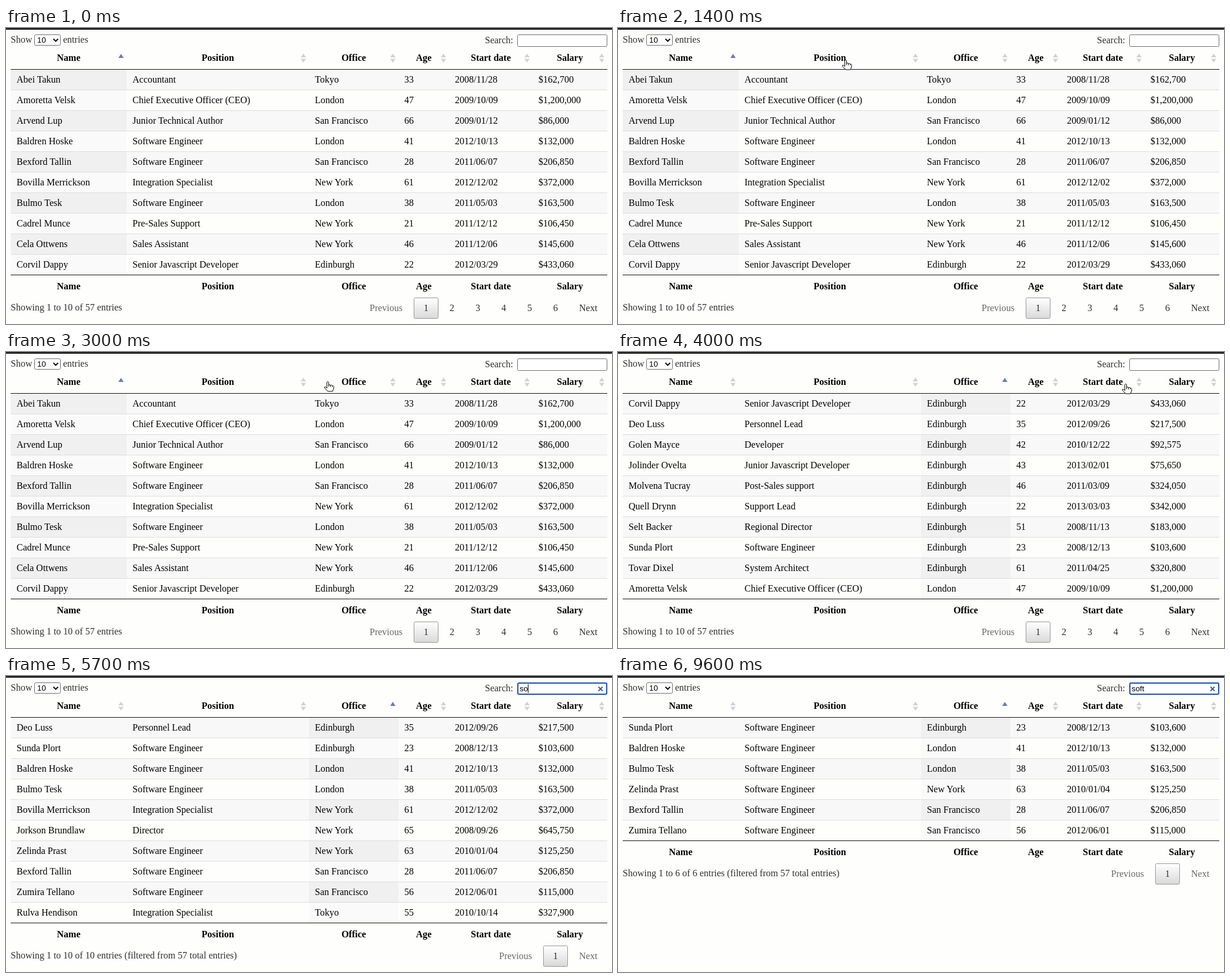
Animation of 1030x504 px, one loop 9700 ms. Source, as an HTML page:

```html
<!DOCTYPE html>
<html lang="en">
<head>
<meta charset="utf-8">
<title>Sortable staff table</title>
<style>
  html, body { margin: 0; width: 100%; height: 100%; overflow: hidden; background: #fefefd; }
  svg { display: block; width: 1030px; height: 504px; }
  text { font: 16px "Liberation Serif", Times, serif; fill: #000; white-space: pre; }
  .head { font-weight: bold; text-anchor: middle; }
  .mid { text-anchor: middle; }
  .soft { fill: #2e2e2e; }
  .off { fill: #666; }
  .ui { font: 13.333px "Liberation Sans", Arial, sans-serif; }
  .line { fill: #ddd; }
  .rule { fill: #111; }
  .odd { fill: #f8f8f8; }
  .odd.sorted { fill: #f0f0f0; }
  .even.sorted { fill: #fafafa; }
  .idle { fill: #d3d3d6; }
  .active { fill: #6c78c4; }
  .field { fill: #fff; stroke: #6e6e6e; }
  .field.focus { stroke: #1b4fae; stroke-width: 2; }
</style>
</head>
<body>
<svg viewBox="0 0 1030 504">
  <defs>
    <linearGradient id="button" x2="0" y2="1">
      <stop offset="0" stop-color="#fff"/>
      <stop offset="1" stop-color="#d9d9d9"/>
    </linearGradient>
  </defs>
  <rect width="1030" height="3" fill="#252525"/>
  <text class="soft" x="8" y="25">Show</text>
  <rect class="field" x="48.5" y="11.5" width="44" height="18" rx="2"/>
  <text class="ui" x="53" y="25">10</text>
  <path d="M80.5 18.5l4 4 4-4" fill="none" stroke="#111" stroke-width="2"/>
  <text class="soft" x="97" y="25">entries</text>
  <text class="soft" x="814" y="26">Search:</text>
  <g id="search"></g>
  <rect id="caret" y="14" width="1" height="15"/>
  <g id="table"></g>
  <g id="pointer" fill="#000" stroke="#fff" stroke-width="1" stroke-linejoin="round">
    <path id="arrow" d="M0 0v15l3.6-3.3 2.6 5.8 2.6-1.1-2.6-5.6h5z"/>
    <path id="hand" fill="#fff" stroke="#000" d="M-1.5 9V1.5Q0-1 1.5 1.5V6q1.5-1 3 .5 2-.8 3 .8 2-.4 2.5 1.4V12l-2 5h-8L-5.5 11q-.5-2.5 2-1.5l2 2zM1.5 6v3M4.5 6.5v3M7.5 7.5v2"/>
    <path id="beam" fill="none" stroke="#000" d="M-3-8q3 0 3 2 0-2 3-2M0-6V6M-3 8q3 0 3-2 0 2 3 2"/>
  </g>
</svg>
<script>
const LOOP = 9700;
const titles = ["Name", "Position", "Office", "Age", "Start date", "Salary"];
const edges = [8, 205, 515, 667, 753, 895, 1022];

const staff = `Abei Takun|Accountant|Tokyo|33|2008/11/28|$162,700
Amoretta Velsk|Chief Executive Officer (CEO)|London|47|2009/10/09|$1,200,000
Arvend Lup|Junior Technical Author|San Francisco|66|2009/01/12|$86,000
Baldren Hoske|Software Engineer|London|41|2012/10/13|$132,000
Bexford Tallin|Software Engineer|San Francisco|28|2011/06/07|$206,850
Bovilla Merrickson|Integration Specialist|New York|61|2012/12/02|$372,000
Bulmo Tesk|Software Engineer|London|38|2011/05/03|$163,500
Cadrel Munce|Pre-Sales Support|New York|21|2011/12/12|$106,450
Cela Ottwens|Sales Assistant|New York|46|2011/12/06|$145,600
Corvil Dappy|Senior Javascript Developer|Edinburgh|22|2012/03/29|$433,060
Gorwick Halders|Accountant|Tokyo|63|2011/07/25|$170,750
Pell Dorv|Chief Financial Officer (CFO)|New York|64|2010/06/09|$725,000
Yoli Menny|Chief Marketing Officer (CMO)|New York|40|2009/06/25|$675,000
Felva Drean|Chief Operating Officer (COO)|San Francisco|48|2010/03/11|$850,000
Delka Sminer|Customer Support|New York|27|2011/01/25|$112,000
Silgo Harwend|Data Coordinator|Singapore|64|2012/04/09|$138,575
Golen Mayce|Developer|Edinburgh|42|2010/12/22|$92,575
Jelas Orimander|Developer|San Francisco|30|2010/07/14|$86,500
Deo Luss|Personnel Lead|Edinburgh|35|2012/09/26|$217,500
Jolinder Ovelta|Junior Javascript Developer|Edinburgh|43|2013/02/01|$75,650
Molvena Tucray|Post-Sales support|Edinburgh|46|2011/03/09|$324,050
Quell Drynn|Support Lead|Edinburgh|22|2013/03/03|$342,000
Selt Backer|Regional Director|Edinburgh|51|2008/11/13|$183,000
Sunda Plort|Software Engineer|Edinburgh|23|2008/12/13|$103,600
Tovar Dixel|System Architect|Edinburgh|61|2011/04/25|$320,800
Jorkson Brundlaw|Director|New York|65|2008/09/26|$645,750
Zelinda Prast|Software Engineer|New York|63|2010/01/04|$125,250
Zumira Tellano|Software Engineer|San Francisco|56|2012/06/01|$115,000
Rulva Hendison|Integration Specialist|Tokyo|55|2010/10/14|$327,900`
  .split("\n").map(row => row.split("|"));

const byName = { sort: 0, total: 57, rows: [0, 1, 2, 3, 4, 5, 6, 7, 8, 9] };
const byPosition = { sort: 1, total: 57, rows: [0, 10, 1, 11, 12, 13, 14, 15, 16, 17] };
const byOffice = { sort: 2, total: 57, rows: [9, 18, 16, 19, 20, 21, 22, 23, 24, 1] };
const matchS = { sort: 2, total: 49, rows: [9, 18, 19, 20, 21, 22, 23, 24, 1, 3] };
const matchSo = { sort: 2, total: 10, rows: [18, 23, 3, 6, 5, 25, 26, 4, 27, 28] };
const matchSoft = { sort: 2, total: 6, rows: [23, 3, 6, 26, 4, 27] };

// start time, table view, query (null while the field is not focused)
const scenes = [
  [0, byName, null], [1600, byPosition, null], [2400, byName, null],
  [3200, byOffice, null], [4500, byOffice, ""], [5300, matchS, "s"],
  [5500, matchSo, "so"], [5850, matchSoft, "sof"], [6000, matchSoft, "soft"]
];

// time, x, y of the pointer tip
const path = [
  [300, 560, 510], [1300, 387, 54], [1700, 387, 54], [2100, 127, 28],
  [2300, 112, 48], [2600, 112, 48], [3100, 596, 50], [3400, 596, 50],
  [4000, 863, 54], [4400, 925, 22], [5100, 925, 22]
];

const $ = id => document.getElementById(id);
const rect = (cls, x, y, w, h) =>
  `<rect class="${cls}" x="${x}" y="${y}" width="${w}" height="${h}"/>`;
const label = (cls, x, y, value) => `<text class="${cls}" x="${x}" y="${y}">${value}</text>`;

function headings(y) {
  return titles.map((t, i) => label("head", (edges[i] + edges[i + 1]) / 2, y, t)).join("");
}

function sortIcon(right, active) {
  const x = right - 9.5;
  return active
    ? `<path class="active" d="M${x - 4.5} 51l4.5-7 4.5 7z"/>`
    : `<path class="idle" d="M${x - 4.5} 50l4.5-6.5 4.5 6.5zM${x - 4.5} 52.5h9l-4.5 6.5z"/>`;
}

function tableRow(cells, i, sort) {
  const top = 71 + 35 * i;
  const stripe = i % 2 ? "even" : "odd";
  let out = i % 2 ? "" : rect("odd", 8, top, 1014, 34);
  out += rect(stripe + " sorted", edges[sort], top, edges[sort + 1] - edges[sort], 34);
  if (i) out += rect("line", 8, top - 1, 1014, 1);
  return out + cells.map((c, k) => label("", edges[k] + 10, top + 22, c)).join("");
}

function pager(total, bottom) {
  const pages = Math.ceil(total / 10);
  const first = 934 - 44 * (pages - 1);
  const y = bottom + 62;
  let out = label("off", first - 96, y, "Previous") +
    `<rect x="${first - 20.5}" y="${bottom + 39.5}" width="41" height="35" rx="2" fill="url(#button)" stroke="#979797"/>`;
  for (let p = 0; p < pages; p++) out += label("mid soft", first + 44 * p, y, p + 1);
  return out + label(pages > 1 ? "soft" : "off", 974, y, "Next");
}

function drawTable({ sort, total, rows }) {
  const bottom = 70 + 35 * rows.length;
  const filtered = total < 57 ? " (filtered from 57 total entries)" : "";
  $("table").innerHTML =
    headings(56) +
    titles.map((_, i) => sortIcon(edges[i + 1], i === sort)).join("") +
    rows.map((id, i) => tableRow(staff[id], i, sort)).join("") +
    rect("rule", 8, 70, 1014, 1) + rect("rule", 8, bottom, 1014, 1) +
    headings(bottom + 25) +
    label("soft", 8, bottom + 61, `Showing 1 to ${rows.length} of ${total} entries${filtered}`) +
    pager(total, bottom);
}

function drawSearch(query) {
  const focus = query !== null;
  $("search").innerHTML = focus
    ? `<rect class="field focus" x="870" y="12" width="151" height="19" rx="2"/>` + label("ui", 873, 26, query)
    : `<rect class="field" x="869.5" y="11.5" width="152" height="20" rx="2"/>`;
  if (!query) {
    $("caret").setAttribute("x", 873);
    return;
  }
  $("search").innerHTML += `<path d="M1007 18.5l7 7m0-7l-7 7" stroke="#3f5a92" stroke-width="2"/>`;
  const width = $("search").querySelector("text").getComputedTextLength();
  $("caret").setAttribute("x", Math.round(873 + width - 0.5));
}

function caretOpacity(t) {
  if (t < 4500) return 0;
  if (t >= 5300 && t < 6000) return 1;
  const phase = (t < 5300 ? t - 4500 : t) % 1000;
  return phase < 500 ? 1 : Math.max(0, 1 - (phase - 450) / 150);
}

function movePointer(t) {
  const k = path.findIndex(p => p[0] > t);
  $("pointer").style.display = k > 0 ? "" : "none";
  if (k < 1) return;
  const [t0, x0, y0] = path[k - 1], [t1, x1, y1] = path[k];
  const u = (t - t0) / (t1 - t0), e = u * u * (3 - 2 * u);
  const x = x0 + (x1 - x0) * e, y = y0 + (y1 - y0) * e;
  const shape = y > 32 && y < 71 ? "hand" : x > 869 && y < 32 ? "beam" : "arrow";
  $("pointer").setAttribute("transform", `translate(${Math.round(x)} ${Math.round(y)})`);
  for (const id of ["arrow", "hand", "beam"]) $(id).style.display = id === shape ? "" : "none";
}

let shown;
function frame() {
  const t = performance.now() % LOOP;
  const scene = scenes.filter(s => s[0] <= t).pop();
  if (scene !== shown) {
    shown = scene;
    drawTable(scene[1]);
    drawSearch(scene[2]);
  }
  $("caret").style.opacity = caretOpacity(t);
  movePointer(t);
  requestAnimationFrame(frame);
}
frame();
</script>
</body>
</html>
```
